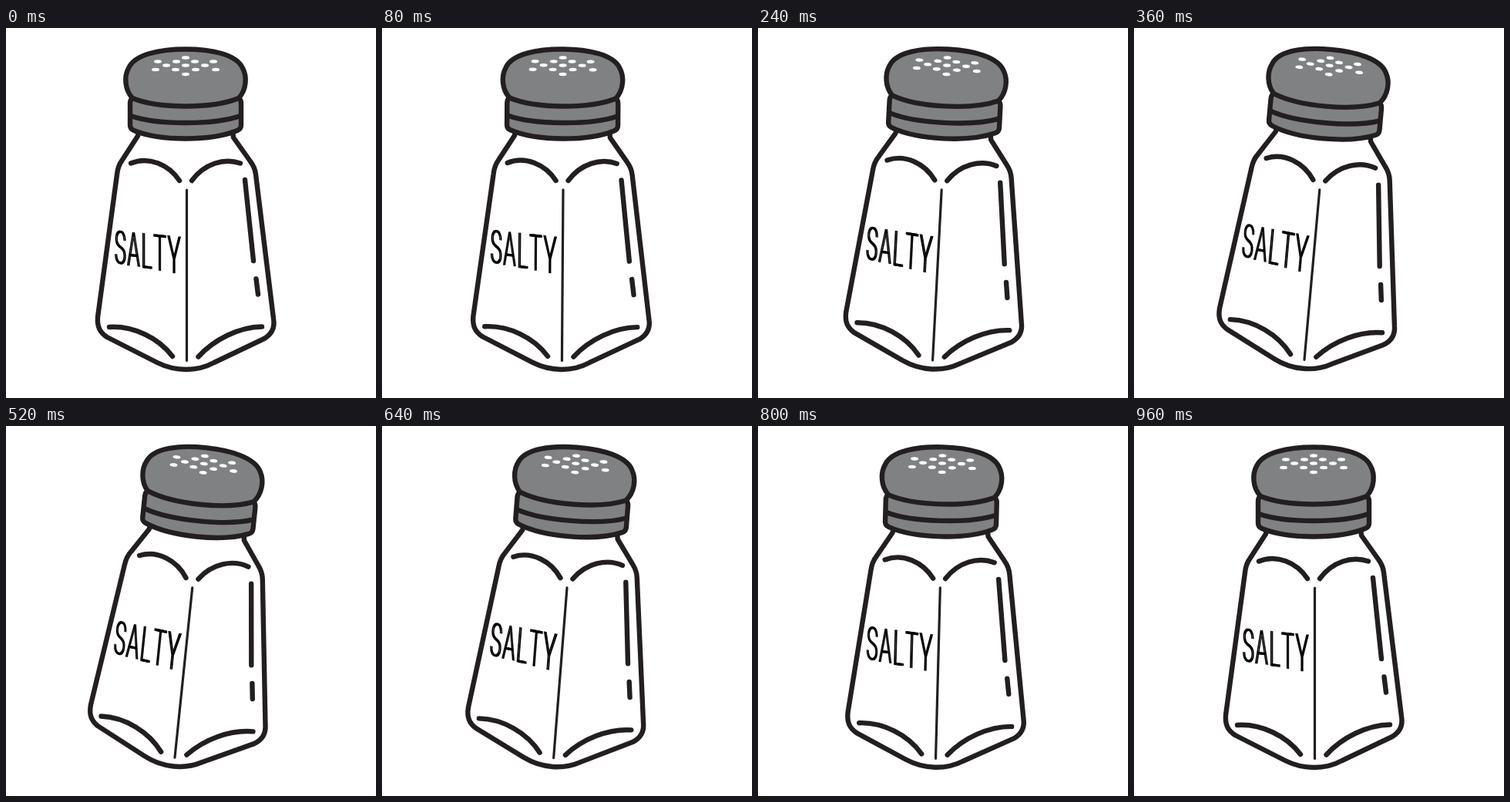
An HTML page for the animation above (1000 ms loop, 480 px wide and 480 px high).

```html
<!DOCTYPE html>
<html lang="en">
<head>
<meta charset="utf-8">
<title>Salt shaker</title>
<style>
  html, body { margin: 0; width: 100%; height: 100%; overflow: hidden; background: #fff; }
  svg { display: block; width: 100%; height: 100%; }
  .ink { fill: none; stroke: #231f20; stroke-width: 6.4; stroke-linecap: round; stroke-linejoin: round; }
  .thin { stroke-width: 3.2; }
  .cap { fill: #808183; }
  text { font-family: Roboto, "Liberation Sans", sans-serif; font-weight: 300; font-kerning: none; letter-spacing: 4px; }
</style>
</head>
<body>
<svg viewBox="0 0 480 480">
  <g id="shaker">
    <g class="ink">
      <!-- glass -->
      <path d="M172 134L171 140L151 171Q145 179 144 190L119 375C118 388 122 395 131 401L196 434C220 446 248 446 270 434L335 403C345 397 349 388 347 377L324 190Q323 181 317 173L295 142L294 134"/>
      <path d="M162 175.500C185 166 211 177 225 198M241 198C257 176 283 168 304 175.500"/>
      <path d="M134 388C165 386 198 402 216 426M249.500 426.500C270 404 302 388 332 387.500"/>
      <path d="M310 197L321 302M324.500 325.500L327 345.500"/>
      <path class="thin" d="M234.500 210V431.500"/>
      <!-- lid -->
      <path class="cap" d="M164 91Q161 93 161 98V126Q161 131 166 133C200 147 266 147 300 133Q305 131 305 126V98Q305 93 302 91Z"/>
      <path d="M162 114C195 126 271 126 304 114"/>
      <path class="cap" d="M164 91C154 80 153 63 159 52C167 34 200 27.500 233 27.500S299 34 307 52C313 63 312 80 302 91C285 98 260 101.500 233 101.500S181 98 164 91Z"/>
    </g>
    <g id="holes" fill="#fff"></g>
    <g transform="matrix(.42 .045 0 1 140 305)">
      <text id="word"><tspan font-size="60">S</tspan><tspan font-size="62" dy="1.200">A</tspan><tspan font-size="64" dy="1.200">L</tspan><tspan font-size="66" dy="1.200">T</tspan><tspan font-size="68" dy="1.200">Y</tspan></text>
      <use href="#word" x="4"/>
    </g>
  </g>
</svg>
<script>
  const shaker = document.getElementById('shaker');
  const rows = [[38.5, 233], [43.5, 197, 221, 245, 269], [48.5, 208, 233, 258], [54, 194, 220, 246, 272], [60, 233]];
  document.getElementById('holes').innerHTML = rows.map(([y, ...xs]) =>
    xs.map(x => `<ellipse cx="${x}" cy="${y}" rx="5" ry="2.2"/>`).join('')).join('');

  // Tilts 6 degrees and back in 24 steps of 40 ms, then rests one step.
  function draw(now) {
    const step = Math.floor(now % 1000 / 40);
    const angle = 3 * (1 - Math.cos(step / 24 * 2 * Math.PI));
    shaker.setAttribute('transform', `rotate(${angle} 240 280)`);
    requestAnimationFrame(draw);
  }
  draw(0);
</script>
</body>
</html>
```
